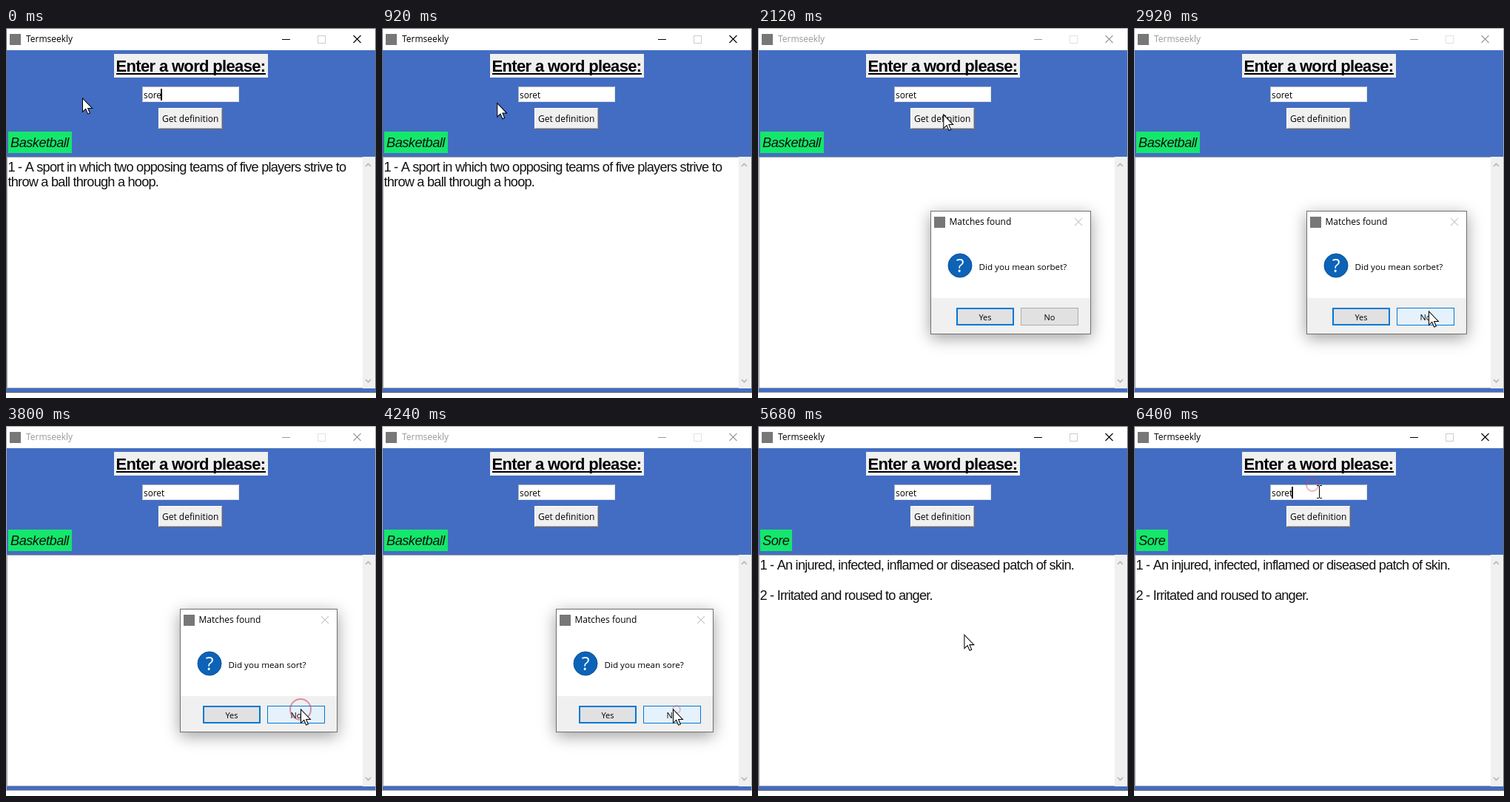
These frames come from a looping animation (500 by 500 pixels, 6440 ms). An HTML page with a canvas:

```html
<!DOCTYPE html>
<html lang="en">
<head>
<meta charset="utf-8">
<title>Termseekly</title>
<style>
html, body { margin: 0; width: 100%; height: 100%; overflow: hidden; background: #fff; }
canvas { display: block; width: 500px; height: 500px; }
</style>
</head>
<body>
<canvas id="stage" width="500" height="500"></canvas>
<script>
const ctx = document.getElementById('stage').getContext('2d');
const LOOP = 6440;
const UI = '"Open Sans", "Noto Sans", sans-serif';
const ARIAL = '"Liberation Sans", Arial, sans-serif';
const BLUE = '#436dc2';
const ACCENT = '#0078d7';

const TYPED = 240, PRESS = 1280, RELEASE = 1900, ANSWER = 4960, REFOCUS = 6060;

const entries = {
  Basketball: [86, [
    '1 - A sport in which two opposing teams of five players strive to',
    'throw a ball through a hoop.'
  ]],
  Sore: [43, [
    '1 - An injured, infected, inflamed or diseased patch of skin.',
    '',
    '2 - Irritated and roused to anger.'
  ]]
};

const dialogs = [
  { word: 'sorbet', x: 233, w: 217, open: 1960, close: 3180 },
  { word: 'sort', x: 235, w: 213, open: 3260, close: 3960 },
  { word: 'sore', x: 235, w: 213, open: 4040, close: ANSWER }
];

// time, x, y of the pointer
const path = [
  [0, 103, 95], [700, 103, 95], [1240, 246, 113], [1360, 248, 113],
  [2080, 248, 113], [2640, 398, 383], [4190, 398, 383], [4240, 393, 383],
  [4420, 297, 383], [5480, 297, 383], [6000, 241, 80], [6120, 241, 80],
  [6400, 250, 89], [LOOP, 250, 89]
];

// time, x, y of each click
const clicks = [
  [PRESS, 246, 113], [2960, 398, 383], [3750, 398, 383],
  [4440, 297, 383], [REFOCUS, 241, 80]
];

const clamp = v => Math.max(0, Math.min(1, v));
const ease = v => v * v * (3 - 2 * v);

function rect(x, y, w, h, color) {
  ctx.fillStyle = color;
  ctx.fillRect(x, y, w, h);
}

function frame(x, y, w, h, color, line = 1) {
  ctx.strokeStyle = color;
  ctx.lineWidth = line;
  ctx.strokeRect(x + line / 2, y + line / 2, w - line, h - line);
}

function text(str, x, y, font, color = '#000', spacing = 0) {
  ctx.font = font;
  ctx.letterSpacing = spacing + 'px';
  ctx.fillStyle = color;
  ctx.fillText(str, x, y);
}

function stroke(points, color, line = 1) {
  ctx.beginPath();
  points.forEach(([x, y], i) => i ? ctx.lineTo(x, y) : ctx.moveTo(x, y));
  ctx.strokeStyle = color;
  ctx.lineWidth = line;
  ctx.stroke();
}

function cross(x, y, color) {
  stroke([[x - 5, y - 5], [x + 5, y + 5]], color, 1.1);
  stroke([[x + 5, y - 5], [x - 5, y + 5]], color, 1.1);
}

function bevel(x, y, w, h, fill, light, dark) {
  rect(x, y, w, h, dark);
  rect(x, y, w - 1, h - 1, light);
  rect(x + 1, y + 1, w - 2, h - 2, fill);
}

function pointerAt(t) {
  const i = Math.max(1, path.findIndex(p => p[0] > t));
  const [t0, x0, y0] = path[i - 1], [t1, x1, y1] = path[i];
  const k = ease(clamp((t - t0) / (t1 - t0)));
  return [x0 + (x1 - x0) * k, y0 + (y1 - y0) * k];
}

function titleBar(active) {
  const ink = active ? '#000' : '#999';
  rect(1, 1, 498, 29, '#fff');
  rect(5, 8, 15, 15, '#777');
  text('Termseekly', 27, 19, '12px ' + UI, ink);
  rect(373, 15, 11, 1, ink);
  frame(421, 10, 11, 11, active ? '#ccc' : '#e2e2e2');
  cross(474.5, 15, ink);
}

function caretOn(t, active) {
  if (!active || (t >= PRESS && t < ANSWER)) return false;
  const start = [REFOCUS, ANSWER, TYPED, 0].find(s => t >= s);
  return (t - start) % 1200 < 600;
}

function form(t, active) {
  rect(1, 30, 498, 462, BLUE);

  rect(146, 35, 208, 32, '#f0f0f0');
  text('Enter a word please:', 148.5, 59, 'bold 22px ' + ARIAL, '#000', -0.66);
  rect(149, 61, 202, 2, '#000');

  const word = t < TYPED ? 'sore' : 'soret';
  bevel(184, 79, 131, 21, '#fff', '#a9b3c6', '#e3e3e3');
  text(word, 186, 95, '11.8px ' + UI);
  if (caretOn(t, active)) {
    rect(Math.round(184.8 + ctx.measureText(word).width), 82, 2, 16, '#000');
  }

  const down = t >= PRESS && t < RELEASE ? 1 : 0;
  if (down) {
    bevel(206, 108, 88, 31, '#f0f0f0', '#696969', '#fff');
    stroke([[207.5, 137], [207.5, 109.5], [292, 109.5]], '#a0a0a0');
  } else {
    bevel(206, 108, 87, 29, '#f0f0f0', '#fff', '#696969');
    stroke([[207, 135.5], [291.5, 135.5], [291.5, 109]], '#b0b0b0');
  }
  text('Get definition', 211 + down, 127 + down, '12px ' + UI);
}

function results(t) {
  const name = t < ANSWER ? 'Basketball' : 'Sore';
  const [width, lines] = entries[name];
  rect(3, 140, width, 29, '#14e76c');
  text(name, 6, 161, 'italic 18.2px ' + ARIAL, '#111', -0.5);

  rect(1, 174, 481, 313, '#a0a0a0');
  rect(2, 175, 480, 311, '#fff');
  rect(482, 174, 17, 313, '#f0f0f0');
  stroke([[486, 187], [489.5, 183.5], [493, 187]], '#b4b4b4', 1.6);
  stroke([[486, 475], [489.5, 478.5], [493, 475]], '#b4b4b4', 1.6);

  if (t < RELEASE || t >= ANSWER) {
    lines.forEach((line, i) =>
      text(line, 2.5, 193.5 + i * 20.5, '18.2px ' + ARIAL, '#111', -0.78));
  }
}

function choice(label, x, hover, primary) {
  const border = hover || primary ? ACCENT : '#adadad';
  rect(x, 378, 78, 24, hover ? '#e5f1fb' : '#e1e1e1');
  frame(x, 378, 78, 24, border, primary ? 2 : 1);
  ctx.textAlign = 'center';
  text(label, x + 39, 395, '11px ' + UI);
  ctx.textAlign = 'left';
}

function dialogBody(d, px, py) {
  const right = d.x + d.w;
  ctx.save();
  ctx.shadowColor = 'rgba(0,0,0,.38)';
  ctx.shadowBlur = 20;
  ctx.shadowOffsetY = 5;
  rect(d.x, 247, d.w, 167, '#fff');
  ctx.restore();

  rect(d.x, 365, d.w, 49, '#f0f0f0');
  frame(d.x, 247, d.w, 167, '#707070');
  rect(d.x + 5, 255, 15, 15, '#777');
  text('Matches found', d.x + 25.5, 266, '12px ' + UI);
  cross(right - 17, 262, '#ccc');

  ctx.beginPath();
  ctx.arc(d.x + 40, 321, 16, 0, Math.PI * 2);
  ctx.fillStyle = '#0c63b7';
  ctx.fill();
  ctx.strokeStyle = '#0a4f96';
  ctx.lineWidth = 1;
  ctx.stroke();
  ctx.textAlign = 'center';
  text('?', d.x + 40, 330, '25px ' + UI, '#fff');
  ctx.textAlign = 'left';
  text(`Did you mean ${d.word}?`, d.x + 65.5, 326.5, '11.65px ' + UI);

  const over = x => px >= x && px < x + 78 && py >= 378 && py < 402;
  const yes = right - 182, no = right - 95;
  choice('Yes', yes, over(yes), true);
  choice('No', no, over(no), false);
}

function dialog(d, t, px, py) {
  const shown = clamp((t - d.open) / 160);
  const gone = clamp((t - d.close) / 160);
  if (!shown || gone === 1) return;
  const scale = 0.95 + 0.05 * ease(shown) - 0.05 * gone;
  const cx = d.x + d.w / 2, cy = 330.5;

  // keep the backdrop so that the window fades as one piece
  backdrop.clearRect(0, 0, 500, 500);
  backdrop.drawImage(ctx.canvas, 0, 0);
  ctx.save();
  ctx.translate(cx, cy);
  ctx.scale(scale, scale);
  ctx.translate(-cx, -cy);
  dialogBody(d, px, py);
  ctx.restore();

  const alpha = shown * (1 - gone) ** 1.4;
  if (alpha < 1) {
    ctx.globalAlpha = 1 - alpha;
    ctx.drawImage(backdrop.canvas, 0, 0);
    ctx.globalAlpha = 1;
  }
}

function rings(t) {
  for (const [start, x, y] of clicks) {
    const r = 16 - (t - start) * 0.0205;
    if (t < start || r <= 0) continue;
    ctx.beginPath();
    ctx.arc(x, y, Math.max(0.1, r - 1), 0, Math.PI * 2);
    ctx.strokeStyle = `rgba(205,70,95,${0.15 + 0.45 * r / 16})`;
    ctx.lineWidth = 2;
    ctx.stroke();
  }
}

function pointer(x, y) {
  if (x > 184 && x < 315 && y > 79 && y < 100) {
    const left = Math.round(x), top = Math.round(y) - 9;
    rect(left, top + 1, 1, 16, '#000');
    for (const edge of [top, top + 17]) {
      rect(left - 3, edge, 3, 1, '#000');
      rect(left + 1, edge, 3, 1, '#000');
    }
    return;
  }
  ctx.save();
  ctx.translate(x + 0.5, y);
  ctx.scale(1.15, 1.15);
  ctx.beginPath();
  ctx.moveTo(0, 0);
  for (const [dx, dy] of [[0, 16], [3.7, 12.6], [6.2, 18.4], [8.6, 17.4], [6.2, 11.7], [11.2, 11.7]]) {
    ctx.lineTo(dx, dy);
  }
  ctx.closePath();
  ctx.fillStyle = '#fff';
  ctx.fill();
  ctx.strokeStyle = '#000';
  ctx.lineWidth = 0.9;
  ctx.stroke();
  ctx.restore();
}

function draw(t) {
  const active = !dialogs.some(d => t >= d.open && t < d.close);
  const [px, py] = pointerAt(t);
  rect(0, 0, 500, 500, '#fff');
  rect(0, 0, 500, 493, active ? '#6b6b6b' : '#aaa');
  titleBar(active);
  form(t, active);
  results(t);
  dialogs.forEach(d => dialog(d, t, px, py));
  rings(t);
  pointer(px, py);
}

const backdrop = Object.assign(document.createElement('canvas'), { width: 500, height: 500 }).getContext('2d');
const begin = performance.now();

function tick() {
  draw((performance.now() - begin) % LOOP);
  requestAnimationFrame(tick);
}
tick();
</script>
</body>
</html>
```
